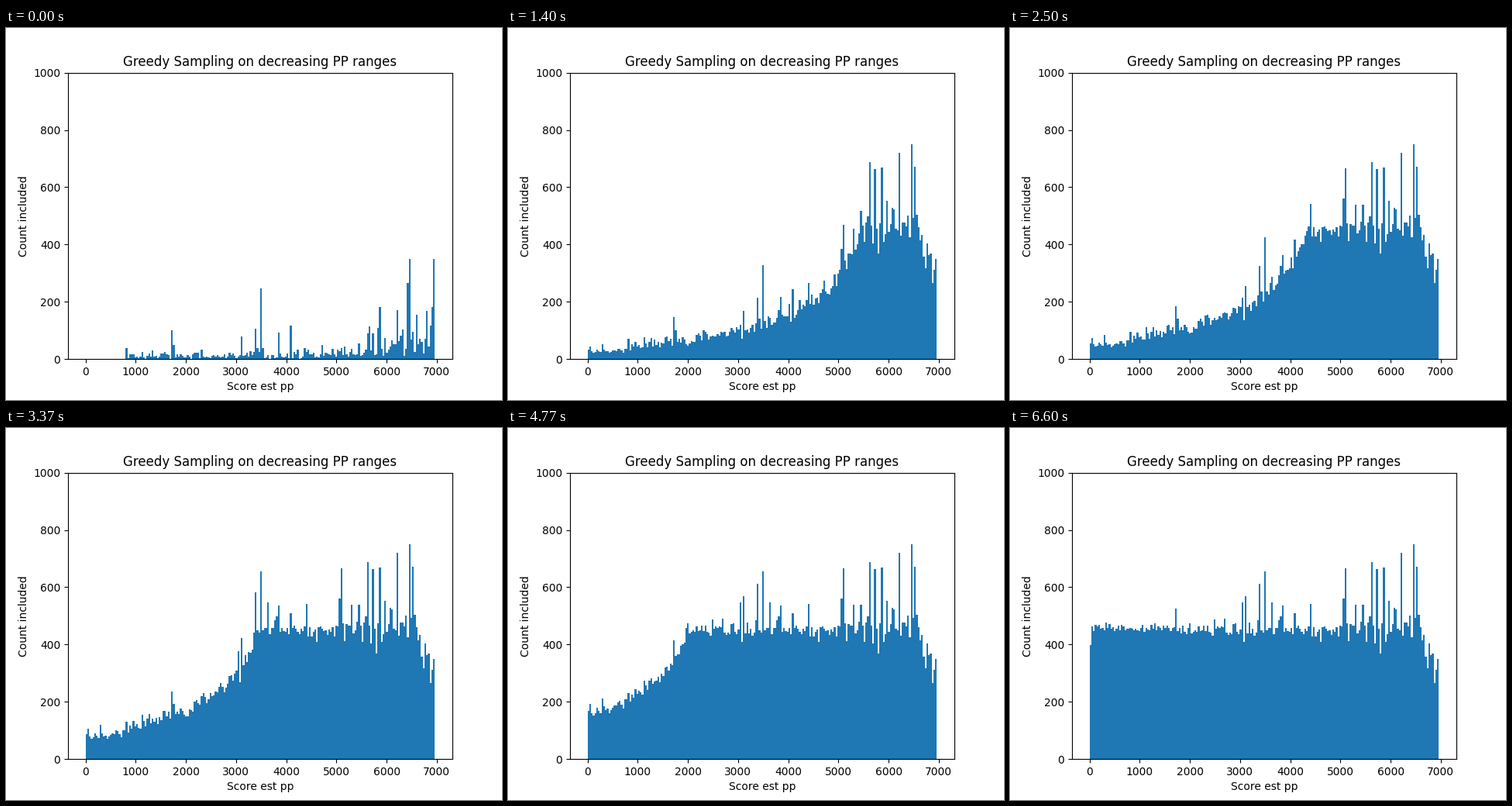
A matplotlib script for the animation above (6.66 s loop, 640 px wide and 480 px high).

```python
import numpy as np
import matplotlib.pyplot as plt
from matplotlib.animation import FuncAnimation

BINS = 200
LOOP_MS = 6660
X_MAX = 6963
FULL = 484        # bins this high need no more samples

# Outstanding bins: count after the first step and when filled.
PEAKS = {
    49: (100, 525), 87: (8, 547), 89: (80, 570), 97: (107, 612),
    100: (247, 655), 104: (14, 547), 110: (92, 535), 117: (117, 508),
    126: (25, 543), 145: (27, 560), 146: (38, 665), 152: (35, 538),
    156: (55, 540), 161: (90, 688), 164: (90, 663), 168: (182, 668),
    171: (73, 552), 178: (172, 720), 185: (350, 750), 187: (95, 672),
    199: (350, 350),
}

rng = np.random.default_rng(7)
edges = np.linspace(0, X_MAX, BINS + 1)
centers = (edges[:-1] + edges[1:]) / 2


def first_counts():
    """Sparse, uneven counts that get denser towards the top scores."""
    base = np.interp(centers, [800, 5300, X_MAX], [13, 20, 110])
    counts = base * rng.gamma(2, 0.5, BINS)
    counts[centers < 800] = 0
    return counts


def final_counts():
    """A flat level, rougher to the right, that drops at the very end."""
    level = np.interp(centers, [6550, X_MAX], [459, 310])
    spread = np.interp(centers, [0, 2000, 5000, 6500], [6, 13, 26, 45])
    return level + spread * rng.normal(0, 1, BINS)


def fill_share(step):
    """Share of its final count that each bin has reached at a step."""
    front = edges[BINS - step]
    gap = np.maximum(front - centers, 0)
    ramp = min(step / 42, 1)
    tail = ramp * (0.87 - 6.5e-5 * front) * np.exp(-gap / 2500)
    head = np.exp(-gap / (0.09 * front * ramp + 1e-6))
    return tail + (1 - tail) * head


def build_counts():
    """Counts by step and bin; step k tops up the k-th bin from the right."""
    first, final = first_counts(), final_counts()
    for j, pair in PEAKS.items():
        first[j], final[j] = pair
    final = np.maximum(first, final)
    pace = rng.normal(1, 0.08, BINS)

    counts = [first]
    for step in range(1, BINS):
        if final[BINS - 1 - step] > FULL:
            counts.append(counts[-1])
            continue
        share = fill_share(step) ** pace
        share[BINS - 1 - step:] = 1
        counts.append(np.maximum(counts[-1], first + (final - first) * share))
    return np.round(counts)


counts = build_counts()

fig, ax = plt.subplots(figsize=(6.4, 4.8), dpi=100)
bars = ax.stairs(counts[0], edges, fill=True, color="C0")
ax.set_xlim(-0.05 * X_MAX, 1.05 * X_MAX)
ax.set_ylim(0, 1000)
ax.set_title("Greedy Sampling on decreasing PP ranges")
ax.set_xlabel("Score est pp")
ax.set_ylabel("Count included")


def update(step):
    bars.set_data(values=counts[step])
    return [bars]


anim = FuncAnimation(fig, update, frames=BINS, interval=LOOP_MS / BINS,
                     repeat=True, repeat_delay=0)
plt.show()
```
